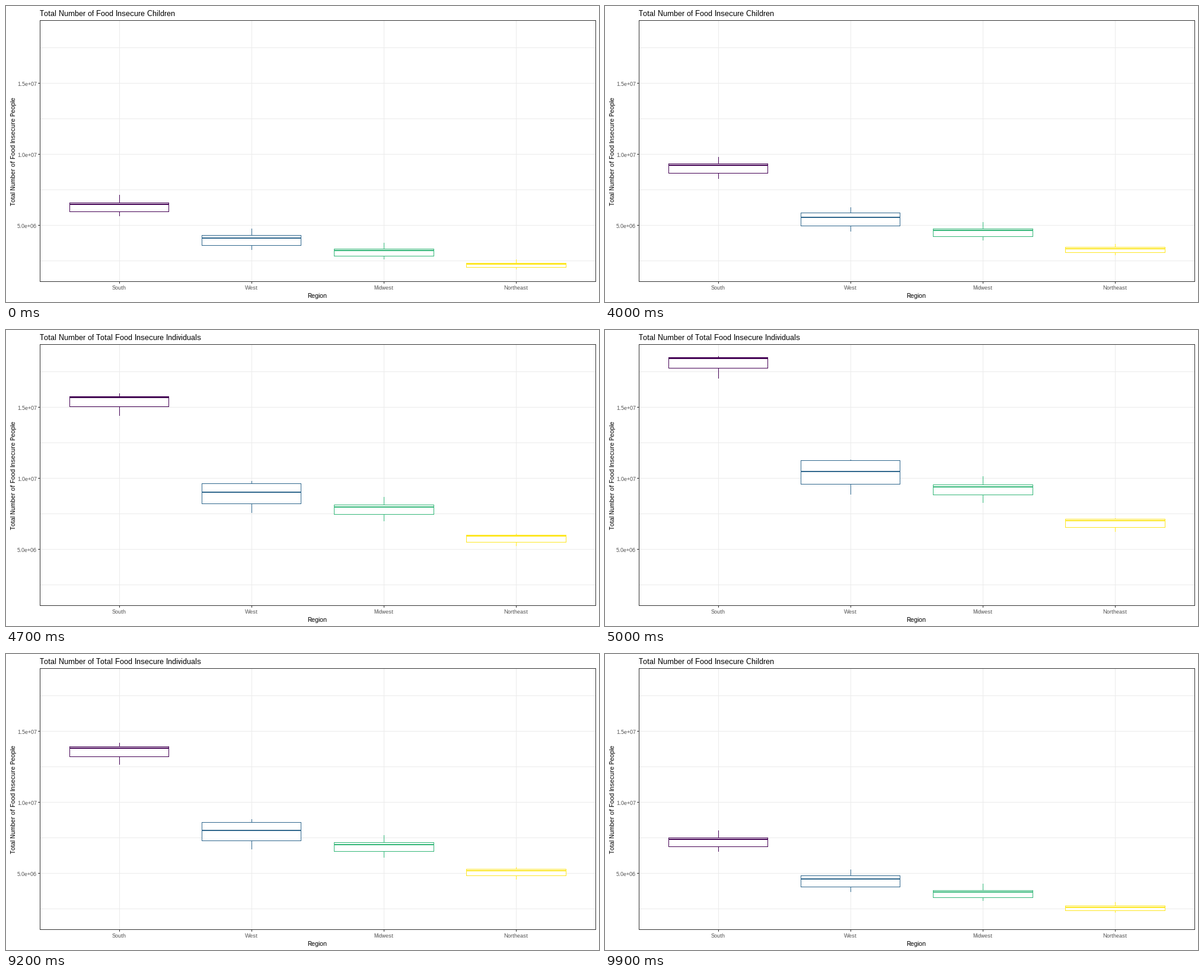
Write a matplotlib script that moves like this. It is 1000 px wide and 500 px high and loops after 10 s.

```python
from math import floor

import matplotlib.pyplot as plt
from matplotlib.animation import FuncAnimation
from matplotlib.patches import Rectangle

W, H = 1000, 500
FRAMES, INTERVAL = 100, 100
HOLD, STEPS = 37, 13  # frames at rest, frames per transition
LEFT, TOP, RIGHT, BOTTOM = 57, 24, 994, 465  # panel border
PITCH = 223.1  # distance between categories
GRID, FRAME, TICK_TEXT = "#ebebeb", "#333333", "#4d4d4d"
TITLES = ("Total Number of Food Insecure Children",
          "Total Number of Total Food Insecure Individuals")

# whole-pixel glyph advances without kerning
plt.rcParams.update({
    "font.family": "Liberation Sans",
    "text.hinting": "native",
    "text.hinting_factor": 1,
    "text.kerning_factor": 12,
})

fig = plt.figure(figsize=(W / 100, H / 100), dpi=100, facecolor="white")
ax = fig.add_axes([0, 0, 1, 1])
ax.set_xlim(0, W)
ax.set_ylim(H, 0)
ax.axis("off")


def block(x0, y0, x1, y1, color, z=1):
    """Fill the pixels x0..x1, y0..y1, both ends included."""
    return ax.add_patch(Rectangle((x0, y0), x1 - x0 + 1, y1 - y0 + 1,
                                  facecolor=color, linewidth=0, zorder=z))


def set_rows(patch, y0, y1):
    patch.set_y(y0)
    patch.set_height(max(0, y1 - y0 + 1))


def label(x, y, text, px, color="black", ha="center", **kw):
    return ax.text(x, y, text, fontsize=px * 0.72, color=color, ha=ha,
                   va="baseline", **kw)


def five_numbers(median, reach, up, down, tail):
    """Heights of whisker ends, hinges and median, from top to bottom."""
    return median - reach, median - up, median, median + down, median + tail


class Box:
    """A boxplot that moves from the children's to the overall numbers.

    spread is the lower half of the children's box; reach, up and down
    are the upper whisker and the two box halves of the overall one.
    """

    def __init__(self, centre, color, medians, spread, reach, up, down):
        self.start = five_numbers(medians[0], spread + 3.4, 2.1 + 0.14 * up,
                                  spread, 1.57 * spread)
        self.end = five_numbers(medians[1], reach, up,
                                down, down + 1.4 * spread)
        mid = floor(centre)
        left, right = (floor(centre + s * 0.375 * PITCH) for s in (-1, 1))

        def part(x0, x1, fill=color, z=4):
            return block(x0, 0, x1, 0, fill, z)

        self.fill = part(left, right, "white", 3)
        self.sides = [part(x, x) for x in (left, right)]
        self.whiskers = [part(mid, mid) for _ in range(2)]
        self.hinges = [part(left, right) for _ in range(2)]
        self.median = part(left, right)

    def pose(self, t):
        values = [a + (b - a) * t for a, b in zip(self.start, self.end)]
        top, upper, _, lower, bottom = map(floor, values)
        median = round(values[2])
        for part in (self.fill, *self.sides):
            set_rows(part, upper, lower)
        for part, y in zip(self.hinges, (upper, lower)):
            set_rows(part, y, y)
        set_rows(self.median, median - 1, median)
        set_rows(self.whiskers[0], top, upper)
        set_rows(self.whiskers[1], lower, bottom)


regions = {
    "South": ("#440154", (335.2, 48.2), 12.3, 4, 1.6, 16.3),
    "West": ("#31688e", (392.2, 238.6), 12.3, 19.4, 18.1, 21.9),
    "Midwest": ("#35b779", (413.2, 265.3), 9.1, 18.1, 3.7, 13),
    "Northeast": ("#fde725", (436.45, 322), 4.95, 3.2, 2.3, 11.3),
}

for i in range(7):
    y = 70 + 60 * i
    block(LEFT, y, RIGHT, y, GRID)
    if i % 2:
        value = 17.5e6 - 2.5e6 * i
        block(LEFT - 3, y, LEFT - 1, y, FRAME)
        label(LEFT - 5, y + 5, f"{value:.1e}", 9, TICK_TEXT, "right")

boxes = []
for i, (name, style) in enumerate(regions.items()):
    centre = 191.2 + PITCH * i
    mid = floor(centre)
    block(mid, TOP, mid, BOTTOM, GRID)
    block(mid, BOTTOM + 1, mid, BOTTOM + 3, FRAME)
    label(mid - 0.5, 479, name, 9, TICK_TEXT)
    boxes.append(Box(centre, *style))

for y in (TOP, BOTTOM):
    block(LEFT, y, RIGHT, y, FRAME, 5)
for x in (LEFT, RIGHT):
    block(x, TOP, x, BOTTOM, FRAME, 5)

label(524.5, 493, "Region", 11)
label(16, 245.5, "Total Number of Food Insecure People", 11,
      rotation=90, rotation_mode="anchor")
title = label(LEFT, 17, TITLES[0], 13, ha="left")


def progress(frame):
    half = FRAMES // 2
    step = min(max(frame % half - HOLD, 0), STEPS) / STEPS
    return step if frame < half else 1 - step


def update(frame):
    t = progress(frame)
    for box in boxes:
        box.pose(t)
    title.set_text(TITLES[t > 0.5])
    return []


anim = FuncAnimation(fig, update, frames=FRAMES, interval=INTERVAL,
                     repeat=True, repeat_delay=0, blit=False)
plt.show()
```
